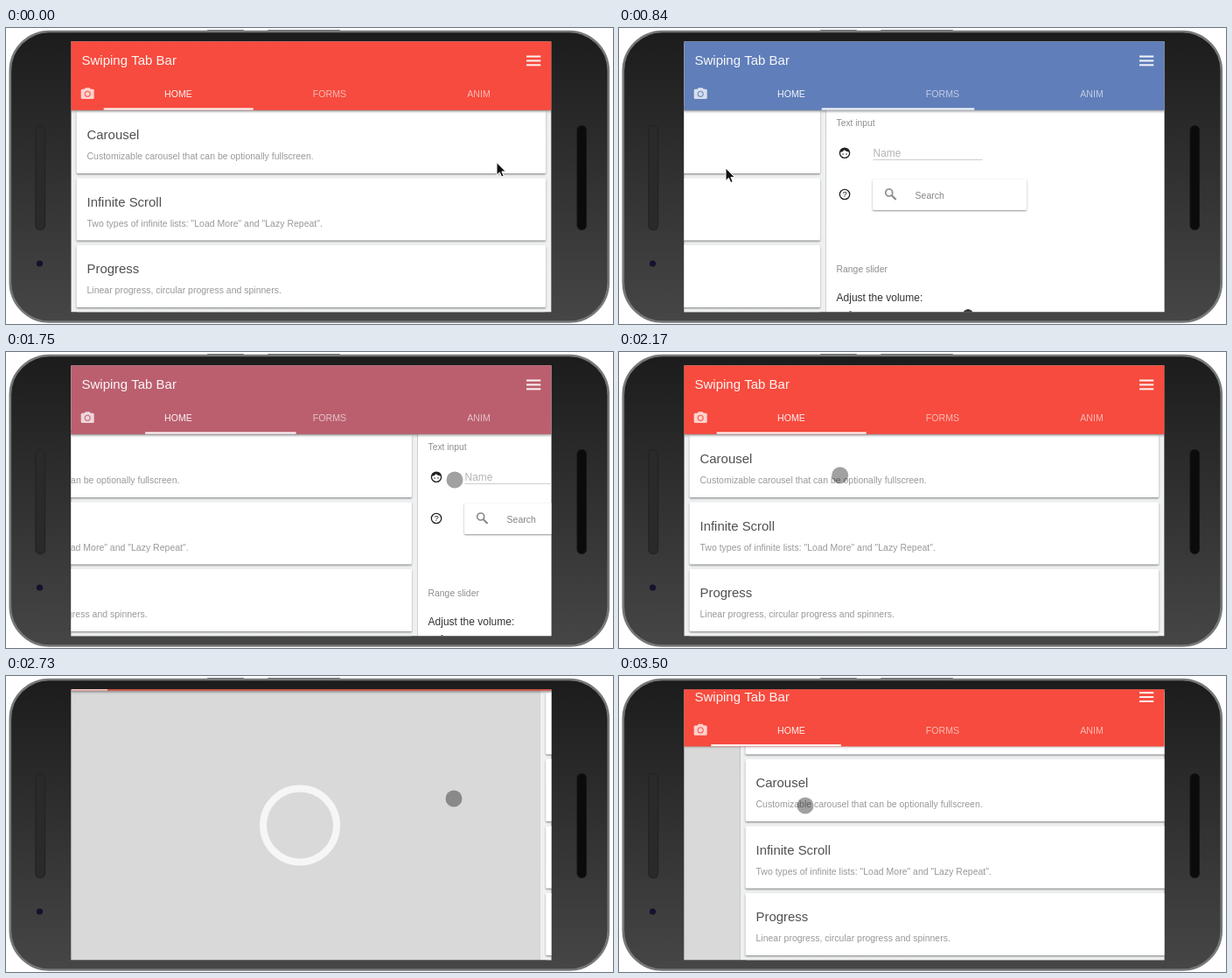
Animation, 694 px wide and 338 px high, one loop 3.57 s. Source, as an HTML page with a canvas:

```html
<!DOCTYPE html>
<html lang="en">
<head>
<meta charset="utf-8">
<title>Swiping Tab Bar</title>
<style>
  html, body { margin: 0; width: 100%; height: 100%; overflow: hidden; background: #fff; }
  canvas { display: block; width: 694px; height: 338px; }
</style>
</head>
<body>
<canvas id="stage" width="694" height="338"></canvas>
<script>
const ctx = document.getElementById('stage').getContext('2d');
const LOOP = 3570, STEP = 70;
const SCREEN = { x: 74.3, y: 15.2, w: 549.3, h: 309.3 };
const BAR_H = 78.6;
const FONT = '"Liberation Sans", Arial, sans-serif';

const linear = k => k;
const easeIn = k => k * k;
const easeOut = k => 1 - (1 - k) ** 2;
const easeBoth = k => k * k * (3 - 2 * k);
const mix = (a, b, k) => a + (b - a) * k;

// Each key: [time, value, easing of the segment that ends here]
function valueAt(keys, t) {
  const i = keys.findIndex(key => key[0] > t);
  if (i < 0) return keys[keys.length - 1][1];
  if (i === 0) return keys[0][1];
  const [t0, v0] = keys[i - 1], [t1, v1, ease = linear] = keys[i];
  return mix(v0, v1, ease((t - t0) / (t1 - t0)));
}

// Page position: -1 camera, 0 home, 1 forms
const scrollKeys = [
  [0, 0], [350, 0], [840, .705, easeBoth], [1120, 1, easeOut],
  [1400, 1], [1680, .52, easeIn], [1750, .279], [1960, 0, easeOut],
  [2170, 0], [2520, -.52, easeIn], [2730, -.977, easeOut], [2800, -1],
  [3150, -1], [3430, -.4, easeIn], [3500, -.1165], [LOOP, 0, easeOut]
];
const pointerX = [
  [0, 561], [350, 535], [840, 122, easeBoth], [980, 42, easeOut], [1120, 60],
  [1400, 211, easeBoth], [1750, 513, easeBoth], [1820, 520], [2170, 252.7, easeBoth],
  [2660, 512, easeBoth], [2870, 512], [3150, 495, easeBoth], [3500, 213, easeBoth]
];
const pointerY = [
  [0, 153.5], [840, 160, easeBoth], [1400, 145], [1750, 146], [2170, 140.7], [2730, 140], [3500, 148]
];
const presses = [[350, 770], [1400, 1820], [2100, 2800], [3150, LOOP]];

function text(str, x, y, size, color, align = 'left') {
  ctx.font = `${size}px ${FONT}`;
  ctx.textAlign = align;
  ctx.fillStyle = color;
  ctx.fillText(str, x, y);
}

function rect(x, y, w, h, color) {
  ctx.fillStyle = color;
  ctx.fillRect(x, y, w, h);
}

function rounded(x, y, w, h, r, fill, stroke, width = 1) {
  ctx.beginPath();
  ctx.roundRect(x, y, w, h, r);
  if (fill) { ctx.fillStyle = fill; ctx.fill(); }
  if (stroke) { ctx.strokeStyle = stroke; ctx.lineWidth = width; ctx.stroke(); }
}

function circle(x, y, r, fill, stroke, width = 1) {
  ctx.beginPath();
  ctx.arc(x, y, r, 0, Math.PI * 2);
  if (fill) { ctx.fillStyle = fill; ctx.fill(); }
  if (stroke) { ctx.strokeStyle = stroke; ctx.lineWidth = width; ctx.stroke(); }
}

function path(d, fill, stroke, width = 1) {
  const p = new Path2D(d);
  if (fill) { ctx.fillStyle = fill; ctx.fill(p); }
  if (stroke) { ctx.strokeStyle = stroke; ctx.lineWidth = width; ctx.stroke(p); }
}

function shifted(x, y, draw) {
  ctx.save();
  ctx.translate(x, y);
  draw();
  ctx.restore();
}

function shadowed(blur, offset, alpha, draw) {
  ctx.save();
  ctx.shadowColor = `rgba(0,0,0,${alpha})`;
  ctx.shadowBlur = blur;
  ctx.shadowOffsetY = offset;
  draw();
  ctx.restore();
}

function verticalGradient(top, bottom) {
  const g = ctx.createLinearGradient(0, 5, 0, 335);
  g.addColorStop(0, top);
  g.addColorStop(1, bottom);
  return g;
}

function drawPhone() {
  rect(0, 0, 694, 338, '#fff');
  rounded(230, 2, 42, 4, 1, '#777');
  rounded(299, 2, 83, 4, 1, '#777');
  rounded(4.8, 4, 684, 331.5, 45, verticalGradient('#1c1c1c', '#464646'), '#767878', 2.6);
  rounded(34, 111.5, 10.5, 119, 5, '#2a2a2a', '#242424', 1.5);
  rounded(653, 111.5, 10.5, 119, 5, '#0b0b0b', '#151515', 1);
  circle(38.5, 269, 3.6, '#13132e');
}

function drawCameraPage() {
  rect(SCREEN.x, SCREEN.y, SCREEN.w, SCREEN.h, '#d9d9d9');
  circle(348.7, 170.5, 42, null, '#f6f6f6', 8);
}

const cards = [
  ['', ''],
  ['Carousel', 'Customizable carousel that can be optionally fullscreen.'],
  ['Infinite Scroll', 'Two types of infinite lists: "Load More" and "Lazy Repeat".'],
  ['Progress', 'Linear progress, circular progress and spinners.'],
  ['', '']
];

function drawHomePage() {
  rect(SCREEN.x, SCREEN.y, SCREEN.w, SCREEN.h, '#eef0f1');
  cards.forEach(([title, note], i) => {
    const y = 18.5 + i * 76.5;
    shadowed(2, 1.3, .42, () => rounded(80.5, y, 536.7, 70.9, 1.5, '#fff'));
    text(title, 92.5, y + 32, 14.95, '#505050');
    text(note, 92.5, y + 55, 10.5, '#999');
  });
}

function drawFace(x, y) {
  circle(x, y, 5.6, null, '#222', 1.4);
  path(`M${x - 5.5} ${y - 1}Q${x - 2} ${y - 1} ${x - .5} ${y - 3.5}Q${x + 2} ${y - 1} ${x + 5.5} ${y - 1.5}A5.6 5.6 0 0 0 ${x - 5.5} ${y - 1}Z`, '#222');
  circle(x - 2, y + 1.2, .8, '#222');
  circle(x + 2, y + 1.2, .8, '#222');
}

function drawFormsPage() {
  rect(SCREEN.x, SCREEN.y, SCREEN.w, SCREEN.h, '#fff');
  text('Text input', 86.5, 111.5, 10.3, '#8e8e8e');
  drawFace(96, 142.8);
  text('Name', 128.5, 147, 11.9, '#b4b4b4');
  rect(128.5, 150, 125, 1, '#cfcfcf');

  circle(96, 190, 5.7, null, '#222', 1.3);
  text('?', 96, 193.3, 9.5, '#222', 'center');

  shadowed(2, 1, .42, () => rounded(128, 172.5, 176, 35.5, 1.5, '#fff'));
  circle(146.7, 188, 4, null, '#8a8a8a', 1.7);
  path('M149.6 191l5 5', null, '#8a8a8a', 2.1);
  text('Search', 176.5, 194.5, 10.5, '#858585');

  text('Hello anonymous!', 489.5, 241, 12, '#777');
  path('M598 244Q593 239 593.5 234Q594 231.5 596 233L598 236L598 230Q599.5 227.5 601 230L602 235L604 230Q606 228.5 606.5 231L606 236Q609 232 610 234Q610 239 606 243Q602 246 598 244Z', null, '#777', 1.1);

  text('Range slider', 86.5, 278.5, 10.4, '#8e8e8e');
  text('Adjust the volume:', 86.5, 311.5, 12, '#333');
  circle(237, 326.5, 5.5, '#3c3c3c');
  rect(101.5, 323, 2, 2, '#666');
  path('M602 323.5q4-1 6 2', null, '#666', 1.3);
}

function drawCameraIcon(color, alpha) {
  ctx.globalAlpha = alpha;
  rounded(85.7, 69.8, 15, 11.3, 1.5, '#fff');
  path('M89.5 70L91 68.2H95.4L96.9 70Z', '#fff');
  circle(93.2, 75.3, 3, null, color, 1.3);
  ctx.globalAlpha = 1;
}

function drawToolbar(pos, active) {
  const k = Math.max(0, pos), side = Math.max(0, -pos);
  const color = `rgb(${mix(246, 33, k)},${mix(75, 147, k)},${mix(62, 236, k)})`;
  shifted(0, -side * 79, () => {
    shadowed(3, 1, .45, () => rect(SCREEN.x, SCREEN.y, SCREEN.w, BAR_H, color));
    text('Swiping Tab Bar', 86.5, 42, 15, 'rgba(255,255,255,.95)');
    [31.5, 36.4, 41.3].forEach(y => rect(595, y, 16.3, 2, 'rgba(255,255,255,.92)'));
    drawCameraIcon(color, active === -1 ? 1 : .75);
    ['HOME', 'FORMS', 'ANIM'].forEach((name, i) => {
      const alpha = active === i ? .92 : .62;
      text(name, [197, 370, 540.5][i], 79, 10.6, `rgba(255,255,255,${alpha})`, 'center');
    });
    const left = 111.7 + 170.3 * k - 37.7 * side;
    const width = 171 + 5 * k - 133 * side;
    rect(left, 91.4, width, 2.2, 'rgba(255,255,255,.95)');
  });
}

function drawPointer(t) {
  const x = valueAt(pointerX, t), y = valueAt(pointerY, t);
  const press = presses.find(([from, to]) => t >= from && t < to);
  if (press && t >= press[0] + STEP) {
    circle(x, y, 9.5, 'rgba(0,0,0,.37)');
    return;
  }
  if (press) circle(x, y + 1.3, 20, 'rgba(255,255,255,.35)', '#111', 3);
  shifted(x, y, () =>
    path('M0 0V14.5L3.4 11.3L5.7 16.6L8.2 15.5L5.9 10.4H10.4Z', '#111', '#fff', 1));
}

function activeTab(t) {
  if (t < 875) return 0;
  if (t < 1700) return 1;
  return t < 2600 || t >= 3430 ? 0 : -1;
}

function draw(t) {
  drawPhone();
  const pos = valueAt(scrollKeys, t);
  // The bar trails the page slightly on the way back from the camera
  const barPos = t > 3150 ? valueAt(scrollKeys, t - 13) : pos;
  ctx.save();
  ctx.beginPath();
  ctx.rect(SCREEN.x, SCREEN.y, SCREEN.w, SCREEN.h);
  ctx.clip();
  [drawCameraPage, drawHomePage, drawFormsPage].forEach((page, i) => {
    const offset = (i - 1 - pos) * SCREEN.w;
    if (Math.abs(offset) < SCREEN.w) shifted(offset, 0, page);
  });
  if (barPos > -1) drawToolbar(barPos, activeTab(t));
  ctx.restore();
  drawPointer(t);
}

const start = performance.now();
function tick() {
  const t = (performance.now() - start) % LOOP;
  draw(Math.floor(t / STEP) * STEP);
  requestAnimationFrame(tick);
}
tick();
</script>
</body>
</html>
```
